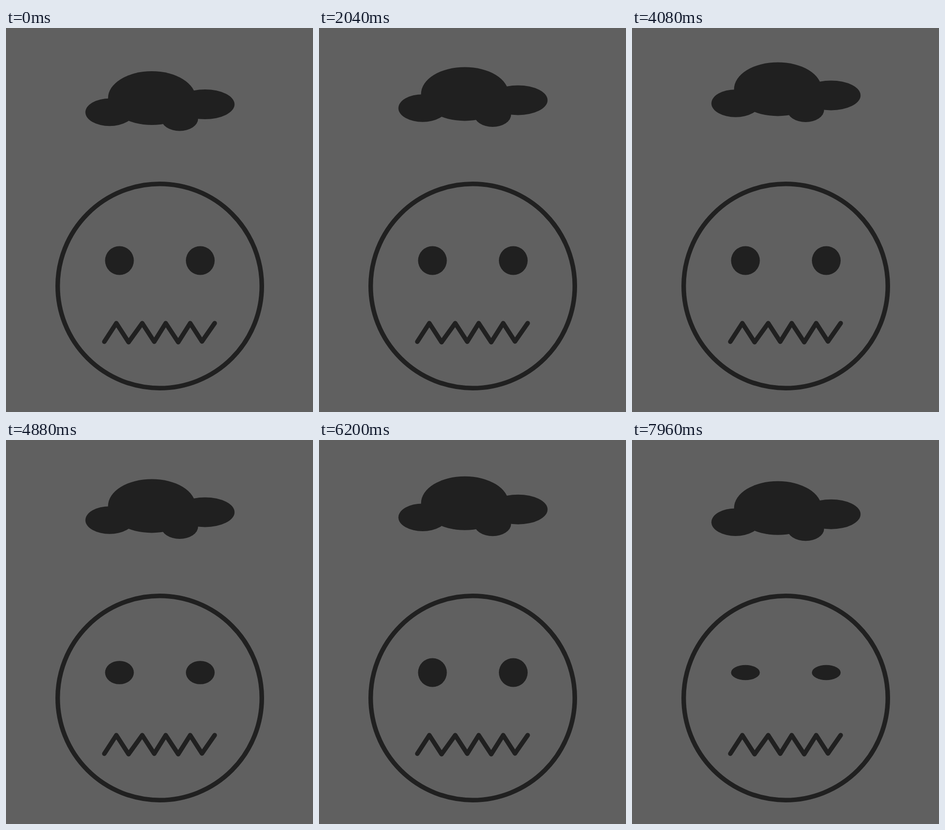
Recreate the animation shown at these times as an HTML page. Size 640 px wide and 800 px high, loop 8 s.

```html
<!DOCTYPE html>
<html lang="en">
<head>
<meta charset="utf-8">
<title>Gloomy face</title>
<style>
  html, body { margin: 0; width: 100%; height: 100%; overflow: hidden; background: #606060; }
  svg { display: block; width: 640px; height: 800px; fill: #202020; }
  .line { fill: none; stroke: #202020; stroke-width: 9.5; stroke-linecap: round; stroke-linejoin: round; }
</style>
</head>
<body>
<svg viewBox="0 0 640 800">
  <g id="cloud">
    <ellipse cx="304" cy="146" rx="91.3" ry="56"/>
    <ellipse cx="216" cy="175.5" rx="50.5" ry="28.8"/>
    <ellipse cx="415" cy="159" rx="61.5" ry="31"/>
    <ellipse cx="362" cy="189" rx="38.5" ry="25.5"/>
  </g>
  <circle class="line" cx="320.5" cy="537.5" r="212.75"/>
  <ellipse class="eye" cx="236.5" cy="484.5" rx="30" ry="30"/>
  <ellipse class="eye" cx="405" cy="484.5" rx="30" ry="30"/>
  <polyline class="line" points="205,653.5 230,615 255.5,654.5 284,615 309,653.5 333,615 359,654.5 384,615 408.5,653 435,615"/>
</svg>
<script>
  const STEP = 40, LOOP = 8000;
  const FLOAT = { cycle: 29, start: 0, half: 14, rise: 20 };
  const BLINK = { cycle: 90, start: 14, half: 10, open: 30, shut: 1.45 };
  const cloud = document.getElementById('cloud');
  const eyes = document.querySelectorAll('.eye');

  // Linear 0 -> 1 -> 0, resting at 0 for the remainder of each cycle.
  function pulse(tick, { cycle, start, half }) {
    return Math.max(0, 1 - Math.abs(tick % cycle - start - half) / half);
  }

  function draw(time) {
    const tick = Math.floor(time % LOOP / STEP);
    cloud.setAttribute('transform', `translate(0 ${-FLOAT.rise * pulse(tick, FLOAT)})`);
    const ry = BLINK.open - (BLINK.open - BLINK.shut) * pulse(tick, BLINK);
    eyes.forEach(eye => eye.setAttribute('ry', ry));
  }

  const began = performance.now();
  function loop() {
    draw(performance.now() - began);
    requestAnimationFrame(loop);
  }
  loop();
</script>
</body>
</html>
```
